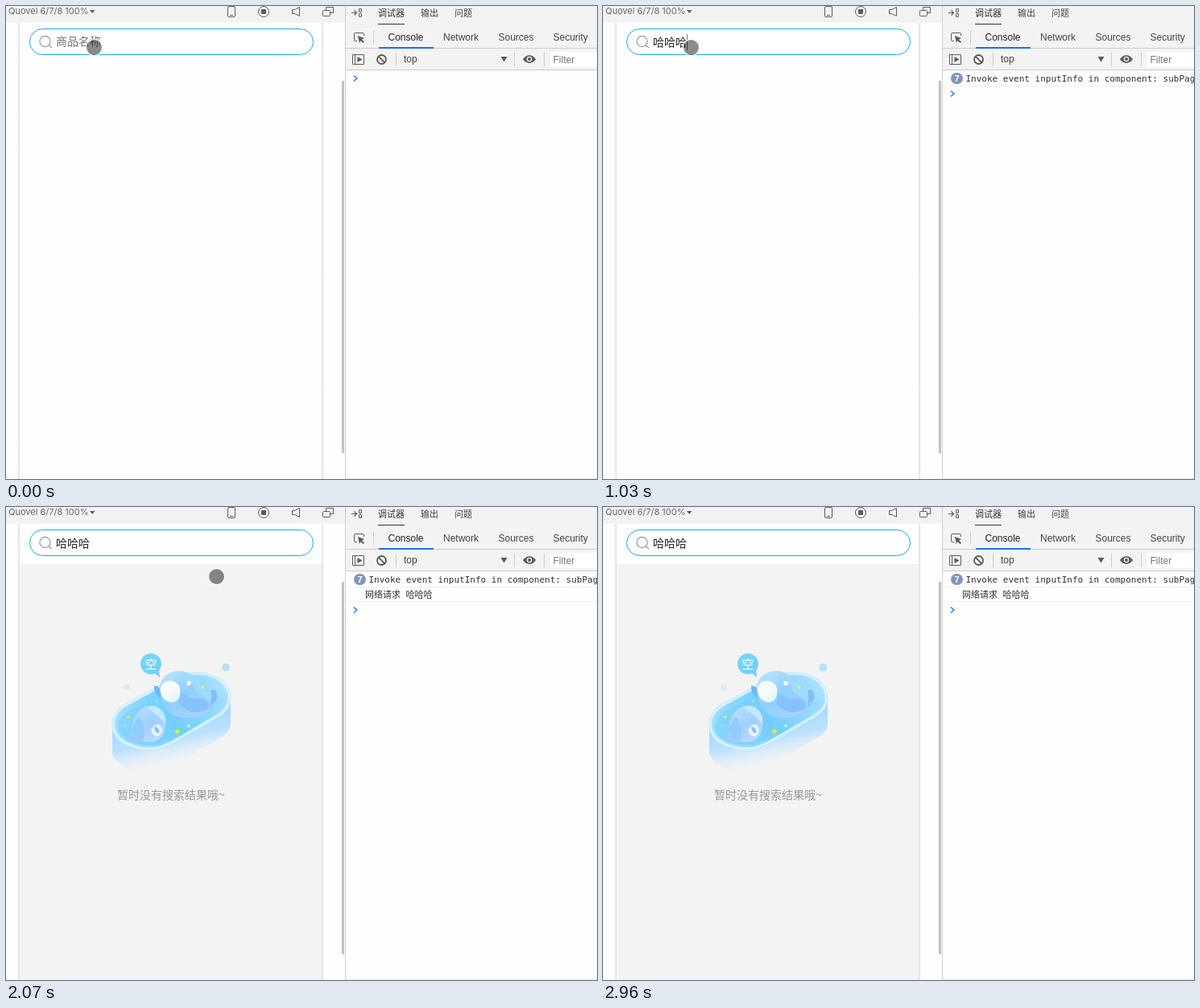
Write an HTML page with a canvas that moves like this. It is 734x588 px and loops after 3110 ms.

```html
<!DOCTYPE html>
<html lang="zh">
<head>
<meta charset="utf-8">
<title>Search debounce</title>
<style>
html, body { margin: 0; width: 100%; height: 100%; overflow: hidden; background: #fefefe; }
canvas { display: block; }
</style>
</head>
<body>
<canvas id="stage" width="734" height="588"></canvas>
<script>
const g = document.getElementById('stage').getContext('2d');
const LOOP = 3110;
const CJK = '"Noto Sans CJK SC", "Noto Sans CJK", sans-serif';
const SANS = '"Liberation Sans", "Noto Sans CJK SC", sans-serif';
const MONO = '"DejaVu Sans Mono", "Noto Sans CJK SC", monospace';

// Typed text, caret and console badge: [from ms, text, composing, caret, count]
const typing = [
  [0, '', false, false, 0],
  [300, '', false, true, 0],
  [440, 'ha', true, true, 0],
  [590, "ha'ha", true, true, 3],
  [740, "ha'ha'ha", true, true, 5],
  [880, "ha'ha'ha", true, true, 6],
  [1030, '哈哈哈', false, true, 7],
  [1320, '哈哈哈', false, false, 7]
];
// Pointer: [from ms, kind, x, y]
const pointer = [
  [0, 'dot', 109.5, 51.5],
  [2070, 'dot', 261.5, 86.5],
  [2220, 'arrow', 425, 138],
  [2520, 'arrow', 629, 434],
  [2660, 'arrow', 660, 486],
  [2810, 'arrow', 704, 586],
  [2960, 'none', 0, 0]
];
const REQUEST = 1180, EMPTY = 1470;

const at = (steps, t) => steps.filter(s => s[0] <= t).pop();

function rect(x, y, w, h, color) {
  g.fillStyle = color;
  g.fillRect(x, y, w, h);
}
function text(str, x, y, font, color, align = 'left') {
  g.font = font;
  g.fillStyle = color;
  g.textAlign = align;
  g.fillText(str, x, y);
}
function paint(path, fill, stroke, width = 1) {
  const p = typeof path === 'string' ? new Path2D(path) : path;
  if (fill) { g.fillStyle = fill; g.fill(p); }
  if (stroke) { g.strokeStyle = stroke; g.lineWidth = width; g.stroke(p); }
}
function disc(x, y, r, fill, stroke, width) {
  const p = new Path2D();
  p.arc(x, y, r, 0, 7);
  paint(p, fill, stroke, width);
}
function box(x, y, w, h, r, fill, stroke, width) {
  const p = new Path2D();
  p.roundRect(x, y, w, h, r);
  paint(p, fill, stroke, width);
}
function fade(x0, y0, x1, y1, ...colors) {
  const f = g.createLinearGradient(x0, y0, x1, y1);
  colors.forEach((c, i) => f.addColorStop(i / (colors.length - 1), c));
  return f;
}
function star(x, y, r, color) {
  const k = r * 0.3;
  paint(`M${x} ${y - r}L${x + k} ${y - k}L${x + r} ${y}L${x + k} ${y + k}L${x} ${y + r}` +
    `L${x - k} ${y + k}L${x - r} ${y}L${x - k} ${y - k}Z`, color);
}

function simulatorBar() {
  const ink = '#5c5c5c';
  rect(0, 0, 421, 20.5, '#f2f2f2');
  text('Quovel 6/7/8 100%', 3, 10, '11px Inter, sans-serif', '#666');
  paint('M104 5H110.5L107.2 9Z', ink);
  box(275.5, 0.5, 9, 13, 1.5, null, ink);
  rect(278, 11, 4, 1, ink);
  disc(320, 7, 6.5, null, ink);
  box(317, 4, 6, 6, 1, ink);
  paint('M355.5 4.5H358.5L364.5 1.5V12.5L358.5 9.5H355.5Z', null, ink);
  paint('M397.5 5V1.5H406.5V8.5H403', null, ink);
  box(393.5, 5.5, 9, 7, 1, null, ink);
}

function phone(empty) {
  rect(0, 20, 421, 568, '#fefefe');
  rect(14, 21, 3, 567, fade(14, 0, 17, 0, '#fafafa', '#dedede'));
  rect(392, 21, 3, 567, fade(392, 0, 395, 0, '#dedede', '#fafafa'));
  rect(17, 21, 375, 567, '#fefefe');
  if (empty) rect(17, 71, 375, 517, '#f3f3f3');
  rect(417, 93, 3, 463, '#c1c1c1');
  box(29.5, 28.5, 352, 32, 16, '#fff', '#1ba6ec');
  disc(48.5, 44, 6.6, null, '#999', 1.2);
  paint('M53 48.8L57 52', null, '#999', 1.2);
}

function field([, str, composing, caret]) {
  if (!str && !caret || !str) text('商品名称', 62, 49, '500 14px ' + CJK, '#777');
  text(str, 62, 50, '14px ' + SANS, '#222');
  const w = str ? g.measureText(str).width : 0;
  if (composing) rect(63, 53, w - 1, 1.6, '#222');
  if (caret) rect(Math.round(62 + w + (composing ? 0.6 : 0)), 35, 1, 20, '#777');
}

function bigWhale() {
  paint('M193 238Q183 232 184 222Q190 222 194 229Z', '#6fb7f5');
  paint('M245 250Q259 246 254 229Q259 224 262 232Q264 240 257 244Q253 257 236 261Z', '#83bdfa');
  paint('M191 229C190 211 203 203 216 204C236 206 249 222 254 241C258 255 242 262 222 262C204 262 193 248 191 229Z',
    fade(200, 205, 235, 262, '#b5e4ff', '#8fcfff', '#a7d2ff'));
  paint('M216 204C236 206 249 222 254 241L236 229Q227 211 216 204Z', '#a2daff');
  paint('M192 225C195 214 209 213 215 222C219 233 215 242 206 243C197 242 192 236 192 225Z',
    fade(195, 217, 215, 242, '#ffffff', '#e2f4ff'));
  paint('M216 231C224 233 228 239 239 238C248 238 252 242 253 247C245 260 222 256 214 243Q218 240 216 231Z', '#86c3fd');
  disc(227, 219, 2.8, '#fff');
}

function smallWhale() {
  paint('M164 276Q151 275 152 290Q164 295 174 291Z', '#98cdfd');
  paint('M157 274C158 257 168 247 181 247C194 248 200 260 198 273C196 288 186 294 173 292C161 290 157 285 157 274Z',
    fade(164, 250, 190, 292, '#b4e0ff', '#a0d0ff', '#bbddff'));
  paint('M181 247C194 248 200 260 198 270Q188 258 174 249Z', '#c5e7ff');
  paint('M165 261Q175 273 170 291Q159 289 157 277Q159 267 165 261Z', '#91cdfd');
  paint('M180 278Q185 268 191 271Q197 277 191 284Q184 288 180 278Z', '#e2f2ff');
  paint('M184 273Q191 274 190 281Q185 281 184 273Z', '#83bbf6');
}

function emptyState() {
  const rim = 'M151 245C137 252 131 264 134 276C138 294 164 302 185 300C194 299 201 295 209 291' +
    'L262 260C274 253 279 244 277 233C273 214 253 206 235 207C222 207 213 211 204 216Z';
  paint('M132 268V306C136 321 157 331 178 330C191 329 200 325 210 320L264 288Q279 281 279 268V236Z',
    fade(192, 255, 207, 326, '#a1d7ff', '#b9e1ff', '#f3f3f300'));
  paint(rim, fade(140, 285, 270, 215, '#a7e0ff', '#6fd0ff', '#aee2ff'), '#c4ebff', 4);
  paint('M153 253C142 260 137 269 139 278C146 294 169 298 190 294L260 254Q273 245 271 235' +
    'C262 244 230 257 211 259L180 241Z', fade(140, 280, 270, 235, '#87d7ff', '#73ceff', '#9cdcff'));
  paint(rim, null, '#e2f6ff', 1.4);
  bigWhale();
  smallWhale();
  paint('M184 206L191 212L190 201Z', '#70d2fb');
  disc(180, 195, 13, fade(170, 184, 190, 208, '#70d8ff', '#78cef8'));
  text('空', 180, 200.5, '15px ' + CJK, '#fff', 'center');
  disc(273, 199.5, 5, '#b8e1fb');
  disc(150, 224, 4, '#d9ebf7');
  star(244, 224, 3, '#e7f531');
  star(213, 279, 4, '#e8f51c');
  star(152, 261, 2.5, '#e7f531');
  disc(213, 279, 2, '#f3ee12');
  disc(227, 272, 1.5, '#e5f7ff');
  disc(187, 241, 1, '#d5f1ff');
  disc(148, 272, 1, '#d5f1ff');
  text('暂时没有搜索结果哦~', 138, 363, '14px ' + CJK, '#999');
}

function devtools() {
  const ink = '#5a5a5a', tab = '12px ' + SANS;
  rect(421, 0, 313, 588, '#fefefe');
  rect(421, 0, 313, 80, '#f3f3f3');
  rect(421, 0, 1, 588, '#cfcfcf');
  rect(422, 52, 312, 1, '#cbcbcb');
  rect(422, 79, 312, 1, '#cbcbcb');
  rect(422, 587, 312, 1, '#e4e4e4');

  paint('M429 8.5H435M432.5 5.5L435.5 8.5L432.5 11.5', null, ink, 1.2);
  box(438.5, 3.5, 3, 4, 0.5, null, ink);
  box(438.5, 9.5, 3, 4, 0.5, null, ink);
  text('调试器', 462, 13, '500 11px ' + CJK, '#333');
  text('输出', 515, 13, '11px ' + CJK, '#444');
  text('问题', 557, 13, '11px ' + CJK, '#444');
  rect(462, 22, 33, 1, '#333');

  paint('M436 43.5H433.5Q432.5 43.5 432.5 42.5V34.5Q432.5 33.5 433.5 33.5H443.5Q444.5 33.5 444.5 34.5V37', null, ink);
  paint('M437 37L445 40L442 41.5L445 44.5L443.5 46L440.5 43L439 46Z', ink);
  [['Console', 474.5, '#222'], ['Network', 543, '#444'], ['Sources', 611.5, '#444'], ['Security', 679.5, '#444']]
    .forEach(([name, x, color]) => text(name, x, 43, tab, color));
  rect(463, 51, 68, 2, '#1a73e8');

  box(430.5, 60.5, 14, 12, 0.5, null, ink);
  rect(433, 60, 1, 12, ink);
  paint('M436.5 63L442.5 66.5L436.5 70Z', ink);
  disc(466.5, 66.5, 5.5, null, ink, 1.8);
  paint('M462.6 62.6L470.4 70.4', null, ink, 1.8);
  text('top', 494, 70, tab, '#444');
  paint('M614.5 63H622.5L618.5 69.5Z', ink);
  paint('M642 66C646 59.5 654 59.5 658 66C654 72.5 646 72.5 642 66Z', ink);
  disc(650, 66, 3.3, '#f3f3f3');
  disc(650, 66, 2, ink);
  rect(676, 57, 58, 19, '#fff');
  text('Filter', 679.5, 71, tab, '#757575');
  rect(456, 31, 1, 16, '#ccc');
  [484, 631, 668].forEach(x => rect(x, 58, 1, 17, '#ccc'));
}

function log(count, requested) {
  let y = 90;
  if (count) {
    box(432, y - 7, 15, 14, 7, '#8097bd');
    text(count, 439.5, y + 4, 'bold 11px ' + SANS, '#fff', 'center');
    text('Invoke event inputInfo in component: subPage', 450.5, y + 4, '11px ' + MONO, '#303030');
    rect(422, y + 9, 312, 1, '#f0f0f0');
    y += 19;
  }
  if (requested) {
    text('网络请求 哈哈哈', 446, y + 4, '11px ' + MONO, '#303030');
    rect(422, y + 8, 312, 1, '#f0f0f0');
    y += 19;
  }
  paint(`M432 ${y - 3.5}L435.8 ${y}L432 ${y + 3.5}`, null, '#367cf1', 1.6);
}

function cursor([, kind, x, y]) {
  if (kind === 'dot') {
    disc(x, y, 10, null, 'rgba(255,255,255,.75)', 1.6);
    disc(x, y, 9.4, 'rgba(0,0,0,.46)');
  } else if (kind === 'arrow') {
    g.save();
    g.translate(x, y);
    g.lineJoin = 'round';
    g.shadowColor = 'rgba(0,0,0,.35)';
    g.shadowBlur = 2;
    g.shadowOffsetY = 1;
    const p = 'M0 0V12.6L2.9 9.9L5 15L7.3 14L5.2 9.2H9.2Z';
    paint(p, null, '#fff', 2);
    g.shadowColor = 'transparent';
    paint(p, '#000');
    g.restore();
  }
}

function draw(now) {
  const t = now % LOOP;
  const state = at(typing, t);
  phone(t >= EMPTY);
  simulatorBar();
  field(state);
  if (t >= EMPTY) emptyState();
  devtools();
  log(state[4], t >= REQUEST);
  cursor(at(pointer, t));
}

const start = performance.now();
function tick() {
  draw(performance.now() - start);
  requestAnimationFrame(tick);
}
tick();
</script>
</body>
</html>
```
